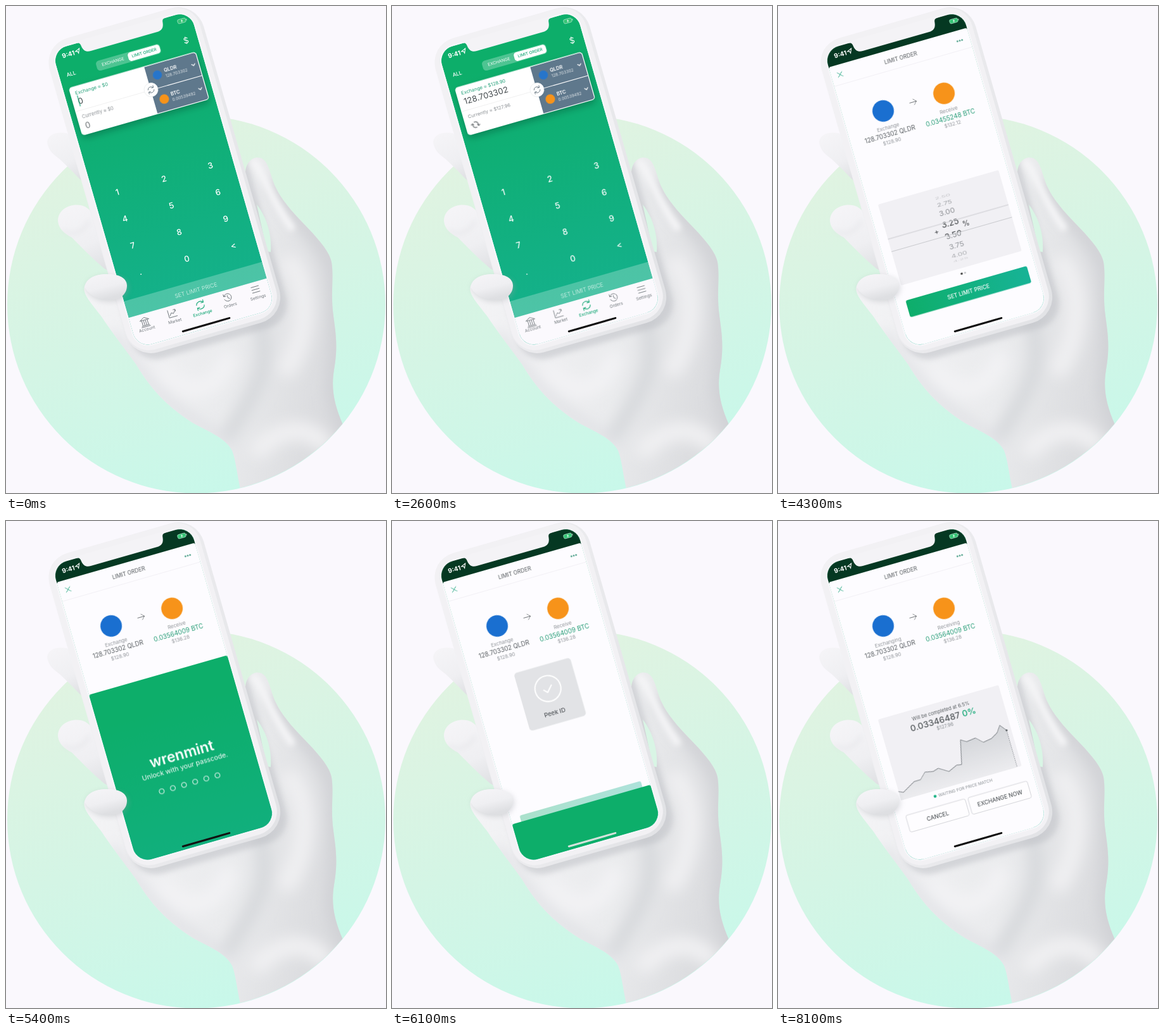
Recreate the animation shown at these times as an HTML page. Size 600 px wide and 770 px high, loop 8.2 s.

```html
<!DOCTYPE html>
<html lang="en">
<head>
<meta charset="utf-8">
<title>Limit order</title>
<style>
html, body { margin: 0; width: 100%; height: 100%; overflow: hidden; background: #faf8fd; }
svg { display: block; width: 600px; height: 770px; }
text { font-family: Inter, Roboto, sans-serif; dominant-baseline: central; }
.mid text, .m { text-anchor: middle; }
.line { fill: none; stroke-linecap: round; stroke-linejoin: round; }
.loop { animation: 8.2s linear infinite; }

#sheet { animation-name: sheet; }
#dim { animation-name: dim; }
#lock { animation-name: lock; }
#hud { animation-name: hud; }
#check { stroke-dasharray: 20; animation-name: check; }
#wheel { animation-name: wheel; }
#confirm { animation-name: confirm; }
#actions { animation-name: actions; }
#chart { animation-name: chart; }
#home { animation-name: home; }
#caret { animation-name: caret; animation-timing-function: step-end; }
#load { animation: spin .82s linear infinite; }

@keyframes sheet {
  0%, 40.488% { transform: translateY(490px); animation-timing-function: cubic-bezier(.333, 1, .667, 1); }
  46.585%, 100% { transform: none; }
}
@keyframes dim {
  0%, 40.488% { opacity: 0; animation-timing-function: cubic-bezier(.333, 1, .667, 1); }
  46.585%, 100% { opacity: .68; }
}
@keyframes lock {
  0%, 64.39% { transform: translateY(490px); animation-timing-function: cubic-bezier(.333, 1, .667, 1); }
  70.488% { transform: translateY(0); }
  71.402% { transform: translateY(0); animation-timing-function: cubic-bezier(.333, 1, .667, 1); }
  77.5%, 100% { transform: translateY(490px); }
}
@keyframes hud { 0%, 66.46% { opacity: 0; } 68.3%, 76.83% { opacity: 1; } 79.27%, 100% { opacity: 0; } }
@keyframes check { 0%, 70.12% { stroke-dashoffset: 20; } 72.56%, 100% { stroke-dashoffset: 0; } }
@keyframes wheel { 0%, 71.4% { opacity: 1; } 73.2%, 100% { opacity: 0; } }
@keyframes confirm { 0%, 72.805% { opacity: 1; } 75.244%, 100% { opacity: 0; } }
@keyframes actions { 0%, 75% { opacity: 0; } 76.83%, 100% { opacity: 1; } }
@keyframes chart { 0%, 77.44% { opacity: 0; } 81.7%, 100% { opacity: 1; } }
@keyframes home { 0%, 66.5% { stroke: #111; } 68%, 75.5% { stroke: #d5e2dc; } 77.5%, 100% { stroke: #111; } }
@keyframes caret { 0% { opacity: 1; } 6.1%, 100% { opacity: 0; } }
@keyframes spin { to { transform: rotate(360deg); } }
</style>
</head>
<body>
<svg viewBox="0 0 600 770">
<defs>
  <linearGradient id="mint" x1=".25" y1="0" x2=".6" y2="1"><stop offset=".05" stop-color="#e1f3e1"/><stop offset=".55" stop-color="#d4f5e5"/><stop offset="1" stop-color="#c8f8ea"/></linearGradient>
  <linearGradient id="skin" x1="0" y1=".3" x2="1" y2=".5"><stop offset="0" stop-color="#f4f4f6"/><stop offset=".6" stop-color="#eaebed"/><stop offset="1" stop-color="#d9dadd"/></linearGradient>
  <linearGradient id="tip" x1="0" y1="0" x2=".4" y2="1"><stop offset="0" stop-color="#f6f5f8"/><stop offset=".6" stop-color="#efeff2"/><stop offset="1" stop-color="#dedfe2"/></linearGradient>
  <linearGradient id="body" x1="0" y1="0" x2="1" y2="1"><stop offset="0" stop-color="#f5f4f7"/><stop offset="1" stop-color="#e1e2e5"/></linearGradient>
  <linearGradient id="green" x1="0" y1="0" x2="0" y2="1"><stop offset=".1" stop-color="#0dae6a"/><stop offset="1" stop-color="#15b18f"/></linearGradient>
  <linearGradient id="button"><stop offset="0" stop-color="#0eae6b"/><stop offset="1" stop-color="#17b396"/></linearGradient>
  <linearGradient id="area" x1="0" y1="0" x2="0" y2="1"><stop offset="0" stop-color="#d2d4d8"/><stop offset="1" stop-color="#ececef"/></linearGradient>
  <filter id="blur" x="-50%" y="-50%" width="200%" height="200%"><feGaussianBlur stdDeviation="11"/></filter>
  <filter id="soft" x="-50%" y="-50%" width="200%" height="200%"><feGaussianBlur stdDeviation="4"/></filter>
  <path id="palm" d="M378 262C379 246 391 237 401 240C412 243 415 256 421 275C428 297 445 318 466 340C487 362 510 385 514 405C518 430 512 455 517 490C521 520 524 540 518 575C513 605 518 630 532 662V780H374L370 764C364 735 362 715 357 703C345 680 315 672 290 656C250 630 225 600 205 566C190 545 170 520 150 490C135 470 120 455 124 443C130 425 155 420 180 428L300 400Z"/>
  <clipPath id="disc"><circle cx="300.5" cy="472" r="298"/></clipPath>
  <clipPath id="hand"><use href="#palm"/></clipPath>
  <clipPath id="screen"><rect y="-28" width="227" height="490" rx="24"/></clipPath>
  <clipPath id="lens"><rect x="15" y="287" width="198" height="20.5"/></clipPath>
  <clipPath id="outer"><path d="M15 230h198v57H15zM15 307.5h198V363H15z"/></clipPath>
  <g id="sync" class="line"><path d="M-5-1A5.2 5.2 0 0 1 4.2-3M5 1A5.2 5.2 0 0 1-4.2 3M4.8-6V-2.8H1.6M-4.8 6V2.8H-1.6"/></g>
  <path id="chevron" class="line" d="M-2.6-1.3 0 1.3 2.6-1.3" stroke="#fff" stroke-width="1.3"/>
</defs>

<rect width="600" height="770" fill="#faf8fd"/>
<circle cx="300.5" cy="472" r="298.5" fill="url(#mint)"/>

<!-- fingers behind the phone -->
<g fill="url(#tip)">
  <path d="M65 215C66 204 78 198 96 201L125 230L135 290L118 275C105 262 92 248 82 240C72 233 66 225 65 215Z"/>
  <path d="M82 340C82 322 100 312 118 315C128 317 133 324 140 330L190 435L155 415C135 398 118 380 104 366C92 360 83 352 82 340Z"/>
</g>
<path class="line" d="M90 355C104 364 122 359 131 340" stroke="#dcdde1" stroke-width="2" filter="url(#soft)"/>

<g clip-path="url(#disc)">
  <use href="#palm" fill="url(#skin)"/>
  <g clip-path="url(#hand)">
    <g class="line" filter="url(#blur)">
      <path d="M424 285C460 345 516 380 520 430C526 510 522 560 518 610L540 680" stroke="#cfd0d4" stroke-width="22"/>
      <path d="M405 430C395 500 415 540 405 575C395 610 375 640 350 680" stroke="#d6d8db" stroke-width="22"/>
      <path d="M170 520C205 570 240 630 355 690" stroke="#dedfe3" stroke-width="14"/>
      <path d="M450 410C480 450 475 520 445 570" stroke="#efeff1" stroke-width="34"/>
      <path d="M250 580C290 620 330 610 350 560" stroke="#f2f2f4" stroke-width="30"/>
      <path d="M400 700C430 670 470 660 500 690" stroke="#f0f0f2" stroke-width="30"/>
    </g>
    <rect x="-6" y="-20" width="254" height="508" rx="40" transform="translate(80 97) rotate(-16)" fill="#b9bbc1" opacity=".5" filter="url(#soft)"/>
    <path class="line" d="M392 248C406 262 414 300 450 350" stroke="#f4f4f6" stroke-width="12" filter="url(#soft)"/>
  </g>
  <path d="M396 314C410 332 420 358 418 389L412 388Z" fill="#d9f5e5"/>
</g>

<g transform="translate(80 97) rotate(-16)">
  <rect x="-12" y="-40" width="253" height="517" rx="42" fill="url(#body)"/>
  <rect x="-11" y="-39.5" width="247" height="511" rx="38" fill="#f2f1f4"/>
  <rect x="-2" y="-30" width="231" height="494" rx="26" fill="#f8f7fa"/>

  <g clip-path="url(#screen)">
    <!-- exchange page -->
    <rect y="-28" width="227" height="490" fill="url(#green)"/>
    <g fill="#fff" class="mid">
      <text x="19.3" y="16" font-size="8.3" font-weight="500">ALL</text>
      <text x="208" y="15" font-size="13">$</text>
      <rect x="61" y="8" width="105" height="16" rx="5" opacity=".27"/>
      <rect x="113" y="9" width="52" height="14" rx="4.5"/>
      <text x="88" y="16" font-size="6.6">EXCHANGE</text>
      <text x="139" y="16" font-size="6.4" font-weight="500" fill="#17a877">LIMIT ORDER</text>
    </g>
    <rect x="9" y="36.5" width="209" height="78.5" rx="5" fill="#fff" style="filter:drop-shadow(0 5px 6px rgba(0,60,40,.35))"/>
    <path d="M133 37.8h80q3.8 0 3.8 3.8v68.4q0 3.8-3.8 3.8h-80z" fill="#5f788c"/>
    <path d="M133 75.7h84" stroke="#fff"/>
    <path d="M9 75.7h124" stroke="#eee" stroke-width=".8"/>
    <circle cx="133.5" cy="75.2" r="11" fill="#fff" stroke="#e4e7e9" stroke-width=".6"/>
    <use href="#sync" transform="translate(133.5 75.2) scale(.95)" stroke="#66757f" stroke-width=".9"/>
    <text id="paid" x="17" y="47.5" font-size="7.5" fill="#23a079"></text>
    <text id="sum" x="17.5" y="61" font-size="13" fill="#434a4d"></text>
    <path id="caret" class="loop" d="M19 51.5v18" stroke="#1aa377" stroke-width="1.2"/>
    <text id="now" x="17" y="86.3" font-size="7.5" fill="#8a8f93"></text>
    <text id="zero" x="18" y="100.5" font-size="13" fill="#6a7073">0</text>
    <g id="busy" transform="translate(25 101.5) scale(.9)"><use id="load" href="#sync" stroke="#555b5e" stroke-width="1.2"/></g>
    <circle cx="149.5" cy="55.5" r="7.2" fill="#2775ca"/>
    <circle cx="149.5" cy="95" r="7.5" fill="#f7931a"/>
    <g fill="#fff">
      <text x="161.5" y="51.3" font-size="7.6" font-weight="600">QLDR</text>
      <text x="161.5" y="61" font-size="6.5" opacity=".8">128.703302</text>
      <text x="161.5" y="90.3" font-size="7.6" font-weight="600">BTC</text>
      <text x="161.5" y="100" font-size="6.5" opacity=".8">0.00539492</text>
    </g>
    <use href="#chevron" x="208.7" y="55.7"/>
    <use href="#chevron" x="208.7" y="95.2"/>
    <g id="keys" class="mid" fill="#fff" font-size="13" font-weight="500"></g>
    <rect y="385" width="227" height="27" fill="#fff" opacity=".24"/>
    <text class="m" x="114.3" y="399" font-size="8.8" font-weight="300" fill="#e4f7f0">SET LIMIT PRICE</text>
    <rect y="412" width="227" height="50" fill="#fbf9fd"/>
    <g class="line" stroke="#70777b" stroke-width=".9">
      <path d="M16 422l7-4 7 4zM17 431h12M16 433h14M18.500 423v7M21.500 423v7M24.500 423v7M27.500 423v7"/>
      <path d="M62 418v12h13M64 427l3-4 3 2 4-5M71 419h3v3"/>
      <path d="M154 421a6 6 0 1 1-.5 5M153.500 418v3.500h3.500M159.500 421v4l2.500 1.500"/>
      <path d="M199 419.500h12M199 424h12M199 428.500h12"/>
    </g>
    <use href="#sync" transform="translate(114.5 424) scale(1.2)" stroke="#17a877" stroke-width=".9"/>
    <g class="mid" font-size="6.6" fill="#70777b">
      <text x="23" y="437.4">Account</text><text x="69" y="437.4">Market</text>
      <text x="114.5" y="437.4" fill="#17a877" font-weight="500">Exchange</text>
      <text x="160" y="437.4">Orders</text><text x="205.5" y="437.4">Settings</text>
    </g>

    <rect id="dim" class="loop" y="-28" width="227" height="490"/>

    <!-- order sheet -->
    <g id="sheet" class="loop">
      <path d="M0 500V3q0-3 3-3h221q3 0 3 3v497z" fill="#fdfcff"/>
      <path d="M10.500 12l7.500 7.500M18 12l-7.500 7.500" class="line" stroke="#17a27a"/>
      <text class="m" x="113.5" y="16.5" font-size="8.5" fill="#54595c">LIMIT ORDER</text>
      <g fill="#2a8f72"><circle cx="206.800" cy="16.500" r="1.200"/><circle cx="210.600" cy="16.500" r="1.200"/><circle cx="214.400" cy="16.500" r="1.200"/></g>
      <path d="M0 31.500h227" stroke="#f0eef3" stroke-width=".8"/>
      <circle cx="63.700" cy="90" r="17" fill="#1a6fd0"/>
      <circle cx="163.700" cy="89.700" r="17" fill="#f7931a"/>
      <path class="line" d="M107.500 89.500h11M114 85l4.500 4.500-4.500 4.500" stroke="#62676a" stroke-width=".9"/>
      <g class="mid" fill="#92969a" font-size="7.8">
        <text id="give" x="64" y="117.2"></text>
        <text x="64" y="128.7" font-size="9.7" fill="#585d60">128.703302 QLDR</text>
        <text x="64" y="140">$128.90</text>
        <text id="take" x="163.5" y="117.2"></text>
        <text id="btc" x="163" y="128.700" font-size="10" fill="#249c75"></text>
        <text id="usd" x="163.500" y="140"></text>
      </g>

      <g id="wheel" class="loop mid">
        <rect x="15" y="230" width="198" height="133" rx="2" fill="#f1f0f4"/>
        <g id="rows" clip-path="url(#outer)" fill="#7d8185" font-size="12"></g>
        <g id="big" clip-path="url(#lens)" fill="#3a3e41" font-size="13.500"></g>
        <path d="M15 287h198M15 307.500h198" stroke="#bfc0c4" stroke-width=".8"/>
        <g fill="#3a3e41" font-size="11.500"><text x="92" y="297">+</text><text x="140.500" y="297.200">%</text></g>
        <circle cx="112" cy="371.500" r="1.800" fill="#444"/><circle cx="117.500" cy="371.500" r="1.600" fill="#c4c5c9"/>
      </g>
      <g id="confirm" class="loop">
        <rect x="15" y="388" width="199" height="27.500" rx="3" fill="url(#button)"/>
        <text class="m" x="114.500" y="401.500" font-size="8.600" font-weight="500" fill="#fff">SET LIMIT PRICE</text>
      </g>

      <g id="chart" class="loop mid">
        <rect x="15" y="230" width="198" height="133" rx="2" fill="#f1f0f4"/>
        <path id="fill" fill="url(#area)"/>
        <path id="curve" class="line" stroke="#6c7276" stroke-width=".9"/>
        <circle cx="205.600" cy="302.300" r="1.500" fill="#555b5e"/>
        <path d="M205.600 303v60" stroke="#6c7276" stroke-width=".8" stroke-dasharray="1.500 1.500"/>
        <text x="114" y="244.800" font-size="7.600" fill="#5a5f62">Will be completed at 6.5%</text>
        <text x="114" y="257.500" font-size="13.700" font-weight="500" fill="#54595c">0.03346487 <tspan fill="#17a877">0%</tspan></text>
        <text x="114" y="269" font-size="7.600" fill="#8a8f93">$127.96</text>
      </g>
      <g id="actions" class="loop mid">
        <circle cx="68.300" cy="371.500" r="2.300" fill="#17b183"/>
        <text x="118" y="372" font-size="6.500" fill="#8a8f93">WAITING FOR PRICE MATCH</text>
        <g fill="#fefdff" stroke="#cbccd1" stroke-width=".8"><rect x="15" y="388" width="97.500" height="27.500" rx="3"/><rect x="117" y="388" width="97.500" height="27.500" rx="3"/></g>
        <g font-size="8.800" font-weight="500" fill="#54595c"><text x="63.700" y="402">CANCEL</text><text x="165.800" y="402">EXCHANGE NOW</text></g>
      </g>
    </g>

    <!-- passcode page -->
    <g id="lock" class="loop">
      <rect y="-28" width="227" height="500" rx="3" fill="url(#green)"/>
      <g class="mid" fill="#fff">
        <text x="114.800" y="102" font-size="23" font-weight="600">wrenmint</text>
        <text x="114.500" y="122.600" font-size="10.700">Unlock with your passcode.</text>
      </g>
      <g id="dots" fill="none" stroke="#fff"></g>
    </g>

    <g id="hud" class="loop">
      <rect x="68" y="169.500" width="92.500" height="95" rx="5" fill="#e2e3e6"/>
      <circle cx="113.500" cy="207.200" r="20.500" fill="none" stroke="#fff" stroke-width="2"/>
      <path id="check" class="line loop" d="M106.500 208l5 5 9-10" stroke="#fff" stroke-width="2"/>
      <text class="m" x="113.500" y="246.800" font-size="9.500" font-weight="500" fill="#55595d">Peek ID</text>
    </g>

    <!-- status bar -->
    <g fill="#fff">
      <text x="13" y="-15.200" font-size="10" font-weight="700">9:41</text>
      <path d="M35.500-16l7-3-3 7-.8-3.200z" fill="none" stroke="#fff" stroke-width="1.100"/>
      <rect x="203.500" y="-19.500" width="13" height="6.500" rx="2" fill="#35c475" stroke="#b9e6d0" stroke-width=".7"/>
      <path d="M217.800-17.500v2.500" stroke="#b9e6d0"/>
      <path d="M211-19l-2.500 3.200h1.500l-.8 2.600 2.600-3.400h-1.500z"/>
    </g>
    <path id="home" class="line loop" d="M76.500 456.200h76.500" stroke-width="3"/>
  </g>
  <path d="M40-31V-28C45-28 46-26 46.500-22C47.500-13 52-10 59-10H168C175-10 179.500-13 180.500-22C181-26 182-28 187-28V-31Z" fill="#f4f3f6"/>
</g>

<!-- fingertip over the phone -->
<path d="M126 447C128 432 144 426 162 427C180 427 193 433 193 445C193 459 180 466 170 467C150 468 137 464 126 447Z" fill="#9fa3a8" opacity=".35" filter="url(#soft)"/>
<path d="M124 445C126 430 142 423 162 424C178 424 191 430 191 442C191 456 180 463 170 464C150 466 135 462 124 445Z" fill="url(#tip)"/>
</svg>

<script>
const LOOP = 8200, PRICE = 127.96, RATE = 0.03346487;
const FILLED = 700, PRICED = 2100, PLACED = 6200;
const SCROLL = { start: 3853, time: 900, from: 1, to: 26 };
const STEP = 0.35, RADIUS = 55;
const $ = id => document.getElementById(id);

function add(parent, tag, attrs, label = '') {
  const el = document.createElementNS('http://www.w3.org/2000/svg', tag);
  for (const name in attrs) el.setAttribute(name, attrs[name]);
  el.textContent = label;
  return parent.appendChild(el);
}

function put(id, label) {
  if ($(id).textContent !== label) $(id).textContent = label;
}

[...'123456789.0<'].forEach((key, i) =>
  add($('keys'), 'text', { x: 37.7 + 76.4 * (i % 3), y: 215.7 + 43.8 * Math.floor(i / 3) }, key));

for (let i = 0; i < 6; i++) add($('dots'), 'circle', { cx: 68.4 + 18.3 * i, cy: 150, r: 4 });

const curve = 'M15 348.5L22 351.7 33 345.5 43 340 53.4 339.9 63.4 330.3 76.2 332.9 85.3 330.3 100.2 339.8 ' +
  '114.6 333.5 122.5 334.8 131.4 296.7 140 302.2 155 300.4 165 310.4 179 308.2 190 302 197.3 291.7 205.6 302.3';
$('curve').setAttribute('d', curve);
$('fill').setAttribute('d', curve + 'V363H15Z');

const rows = Array.from({ length: 9 }, () => add($('rows'), 'text', {}));
const big = Array.from({ length: 3 }, () => add($('big'), 'text', { x: 116.5 }));

function setRow(el, n) {
  el.textContent = n < 1 ? '' : (n / 4).toFixed(2);
}

function drawWheel(pos) {
  const near = Math.round(pos);
  rows.forEach((el, i) => {
    const n = near + i - 4, angle = (n - pos) * STEP;
    const flat = Math.max(0, Math.cos(angle));
    setRow(el, n);
    el.setAttribute('transform', `translate(116.5 ${297 + RADIUS * Math.sin(angle)}) scale(1 ${flat})`);
    el.setAttribute('opacity', Math.abs(angle) > 1.5 ? 0 : flat);
  });
  big.forEach((el, i) => {
    const n = near + i - 1;
    setRow(el, n);
    el.setAttribute('y', 297 + 20 * (n - pos));
  });
}

function draw(t) {
  const k = Math.min(1, Math.max(0, (t - SCROLL.start) / SCROLL.time));
  const pos = SCROLL.from + (SCROLL.to - SCROLL.from) * k * k * (3 - 2 * k);
  const gain = 1 + Math.round(pos) / 400;
  drawWheel(pos);
  put('btc', (RATE * gain).toFixed(8) + ' BTC');
  put('usd', '$' + (PRICE * gain).toFixed(2));

  const filled = t >= FILLED, priced = t >= PRICED, placed = t >= PLACED;
  put('sum', filled ? '128.703302' : '0');
  put('paid', 'Exchange ≈ $' + (priced ? '128.90' : '0'));
  put('now', 'Currently ≈ $' + (priced ? '127.96' : '0'));
  put('give', placed ? 'Exchanging' : 'Exchange');
  put('take', placed ? 'Receiving' : 'Receive');
  $('zero').style.visibility = filled ? 'hidden' : 'visible';
  $('busy').style.visibility = filled ? 'visible' : 'hidden';
}

let begin;
function tick(now) {
  begin ??= now;
  draw((now - begin) % LOOP);
  requestAnimationFrame(tick);
}
draw(0);
requestAnimationFrame(tick);
</script>
</body>
</html>
```
